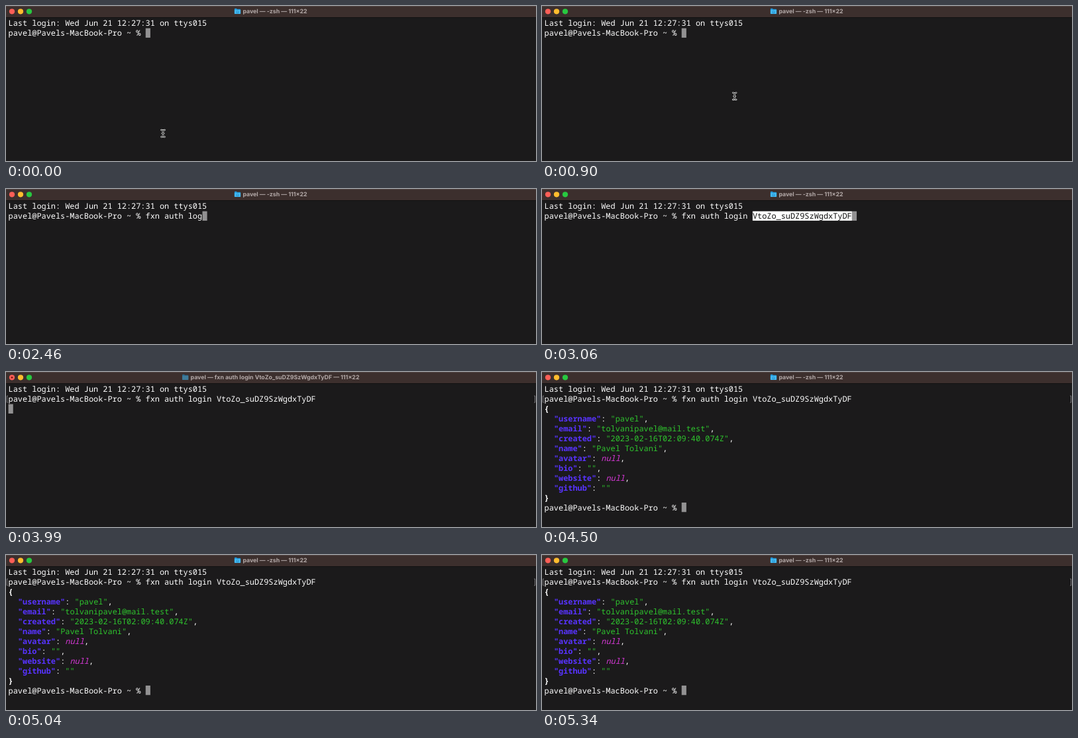
An HTML page for the animation above (5.37 s loop, 800 by 235 pixels).

```html
<!DOCTYPE html>
<html lang="en">
<head>
<meta charset="utf-8">
<title>Terminal login</title>
<style>
  html, body { margin: 0; width: 100%; height: 100%; overflow: hidden; background: #1b1a1b; }
  svg { display: block; width: 800px; height: 235px; }
  text { white-space: pre; text-rendering: geometricPrecision; }
  #screen text { font: 11.905px "Noto Sans Mono", "DejaVu Sans Mono", monospace; fill: #fff; }
  #screen .key { fill: #5833ff; font-weight: 700; }
  #screen .str { fill: #2fc42e; }
  #screen .nil { fill: #d338d3; font-style: italic; }
  #screen .bold { font-weight: 700; }
  #screen .inverse { fill: #111; }
  #title { font: 700 8.8px Inter, "Liberation Sans", sans-serif; fill: #b3a9a8; text-anchor: middle; }
</style>
</head>
<body>
<svg viewBox="0 0 800 235">
  <rect width="800" height="235" fill="#1b1a1b"/>
  <rect width="800" height="17" fill="#3c2f2d"/>
  <rect width="800" height="0.6" fill="#5a4e4c"/>
  <rect y="17" width="800" height="1" fill="#111011"/>
  <circle cx="9" cy="8.3" r="4.1" fill="#ff5f57"/>
  <circle id="busyDot" cx="9" cy="8.3" r="1.4" fill="#7d1511"/>
  <circle cx="22" cy="8.3" r="4.1" fill="#febc2e"/>
  <circle cx="35" cy="8.3" r="4.1" fill="#28c840"/>
  <g id="folder">
    <path d="M0 .8Q0 0 .8 0H3L4 1H8.4Q9.2 1 9.2 1.8V7.4Q9.2 8.2 8.4 8.2H.8Q0 8.2 0 7.4Z" fill="#249bdc"/>
    <path d="M0 2.2H9.2V7.4Q9.2 8.2 8.4 8.2H.8Q0 8.2 0 7.4Z" fill="#43b9f2"/>
    <path id="house" d="M2.6 5.2L4.6 3.4L6.6 5.2M3.3 5V6.8H5.9V5" fill="none" stroke="#1c84c0" stroke-width=".7"/>
  </g>
  <text id="title" x="406" y="11.2"></text>
  <g id="screen"></g>
  <path id="marks" d="M3 36.2H1.5V46.2H3M797 36.2H798.5V46.2H797" fill="none" stroke="#77767a"/>
  <g id="pointer" fill="none" stroke-linecap="round">
    <path id="beam" d="M-2.6 -5.2Q0 -5.2 0 -3Q0 -5.2 2.6 -5.2M0 -3V3M-2.6 5.2Q0 5.2 0 3Q0 5.2 2.6 5.2M-1.3 0H1.3" stroke="#e4e4e4" stroke-width="2.3"/>
    <use href="#beam" style="display:none"/>
    <path d="M-2.6 -5.2Q0 -5.2 0 -3Q0 -5.2 2.6 -5.2M0 -3V3M-2.6 5.2Q0 5.2 0 3Q0 5.2 2.6 5.2M-1.3 0H1.3" stroke="#151515" stroke-width=".9"/>
  </g>
</svg>
<script>
const LOOP = 5370;
const CELL = { x: 3.6, y: 18.8, w: 7.143, h: 14.93 };
const TIMES = { move: 540, paste: 2910, enter: 3510, done: 4500 };
const KEYS = [1400, 1510, 1620, 1730, 1840, 1930, 2010, 2090, 2180, 2270, 2350, 2430, 2510, 2590, 2680];

const USER = "pavel";
const PROMPT = USER + "@Pavels-MacBook-Pro ~ % ";
const COMMAND = "fxn auth login ";
const TOKEN = "VtoZo_suDZ9SzWgdxTyDF";
const PROFILE = {
  username: USER,
  email: "tolvanipavel@mail.test",
  created: "2023-02-16T02:09:40.074Z",
  name: "Pavel Tolvani",
  avatar: null,
  bio: "",
  website: null,
  github: ""
};

const byId = id => document.getElementById(id);
const screen = byId("screen");
const show = (id, on) => byId(id).setAttribute("visibility", on ? "visible" : "hidden");

function add(parent, tag, attrs, content = "") {
  const el = document.createElementNS("http://www.w3.org/2000/svg", tag);
  for (const name in attrs) el.setAttribute(name, attrs[name]);
  el.textContent = content;
  parent.append(el);
}

// Each segment is [text, class].
function line(row, ...segments) {
  let col = 0;
  for (const [text, style = ""] of segments) {
    add(screen, "text", {
      x: CELL.x + col * CELL.w,
      y: CELL.y + row * CELL.h + 11.6,
      class: style
    }, text);
    col += text.length;
  }
}

function block(row, col, length, fill) {
  add(screen, "rect", {
    x: CELL.x + col * CELL.w, y: CELL.y + row * CELL.h,
    width: length * CELL.w, height: CELL.h - 0.6, fill
  });
}

const cursor = (row, col) => block(row, col, 1, "#929192");

function printProfile() {
  const entries = Object.entries(PROFILE);
  line(2, ["{", "bold"]);
  entries.forEach(([key, value], i) => line(3 + i,
    ["  "], [`"${key}"`, "key"], [": "],
    [JSON.stringify(value), value === null ? "nil" : "str"],
    [i < entries.length - 1 ? "," : ""]));
  line(11, ["}", "bold"]);
  line(12, [PROMPT]);
  cursor(12, PROMPT.length);
}

function setTitle(running) {
  const job = running ? COMMAND + TOKEN : "-zsh";
  byId("title").textContent = `${USER} — ${job} — 111×22`;
  const left = 406 - byId("title").getComputedTextLength() / 2 - 12.5;
  byId("folder").setAttribute("transform", `translate(${left} 3.8)`);
  byId("folder").setAttribute("opacity", running ? 0.55 : 1);
  show("house", !running);
  show("busyDot", running);
}

function drawScreen(typed, pasted, entered, done) {
  screen.replaceChildren();
  line(0, ["Last login: Wed Jun 21 12:27:31 on ttys015"]);
  const text = PROMPT + COMMAND.slice(0, typed);
  if (pasted && !entered) block(1, text.length, TOKEN.length, "#fff");
  line(1, [text], [pasted ? TOKEN : "", entered ? "" : "inverse"]);
  if (!entered) cursor(1, text.length + (pasted ? TOKEN.length : 0));
  else if (done) printProfile();
  else cursor(2, 0);
  show("marks", entered);
  setTitle(entered && !done);
}

let lastState = "";
function render(t) {
  const typed = KEYS.filter(k => t >= k).length;
  const state = [typed, t >= TIMES.paste, t >= TIMES.enter, t >= TIMES.done];
  if (state.join() !== lastState) {
    drawScreen(...state);
    lastState = state.join();
  }
  const p = Math.min(t / TIMES.move, 1);
  const eased = p * p * (3 - 2 * p);
  byId("pointer").setAttribute("transform",
    `translate(${237 + 53.7 * eased} ${193.2 - 56.4 * eased})`);
  show("pointer", typed === 0);
}

const start = performance.now();
function tick() {
  render((performance.now() - start) % LOOP);
  requestAnimationFrame(tick);
}
render(0);
requestAnimationFrame(tick);
</script>
</body>
</html>
```
